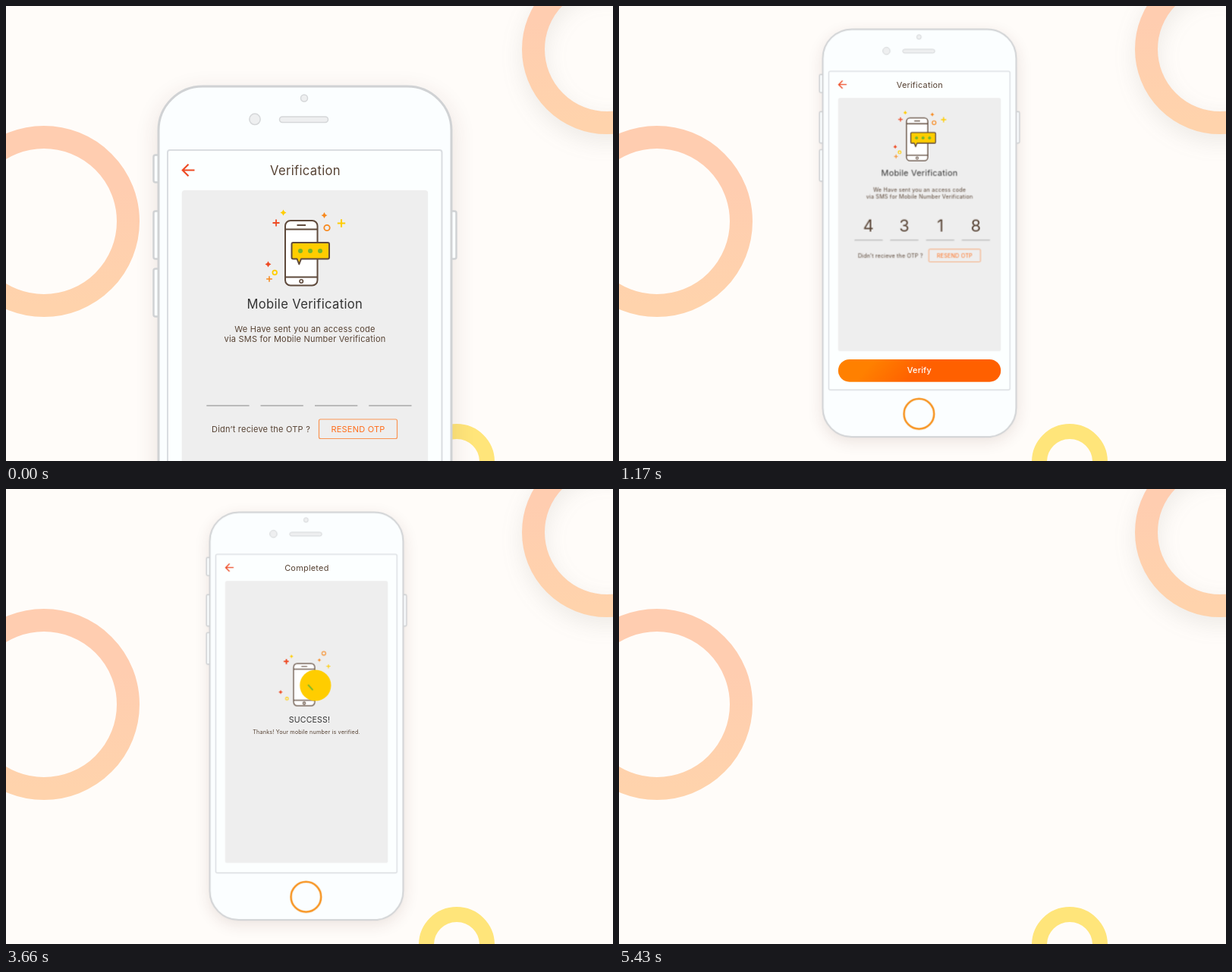
An HTML page for the animation above (5.88 s loop, 800 by 600 pixels).

```html
<!DOCTYPE html>
<html lang="en">
<head>
<meta charset="utf-8">
<title>Mobile verification</title>
<style>
html, body { margin: 0; width: 100%; height: 100%; overflow: hidden; background: #fffcf9; }
svg { display: block; width: 800px; height: 600px; }
text { font-family: Inter, "Open Sans", sans-serif; font-size: 11px; letter-spacing: .02em; text-anchor: middle; fill: #574334; }
.head { font-size: 16.6px; }
.dark { fill: #333; }
.digit { font-size: 33px; letter-spacing: 0; }
.line { fill: none; stroke: #5f4a3c; stroke-width: 2; }
.shell { fill: #fbfeff; stroke: #d0d2d4; }
.part { fill: #eeeff0; stroke: #d5d7d9; stroke-width: 1.5; }
.red { color: #ee4a23; }
.orange { color: #f7891e; }
.yellow { color: #ffcd00; }
.mark { fill: none; stroke: currentColor; stroke-width: 1.8; }

/* every animation shares one loop; smoothstep easing by default */
.a { animation: 5880ms cubic-bezier(.333, 0, .667, 1) infinite both; }
.leave { animation-name: leave; animation-timing-function: linear; }
.zoomY { animation-name: zoomY; }
.zoom { animation-name: zoom; transform-origin: 400px 59.6px; }
.panel { animation-name: panel; }
.button { animation-name: button; animation-timing-function: linear; }
.titleOut { animation-name: titleOut; }
.titleIn { animation-name: titleIn; }
.slide { animation-name: slide; }
.formOut { animation-name: formOut; animation-timing-function: linear; }
.digit { animation-name: digit; animation-delay: calc(var(--i) * 120ms); }
.iconOut { animation-name: iconOut; animation-timing-function: linear; }
.success { animation-name: success; }
.thanks { animation-name: thanks; }
.badgeY { animation-name: badgeY; }
.badgeZoom { animation-name: badgeZoom; transform-origin: 400px 444.5px; }
.phoneIn { animation-name: phoneIn; animation-timing-function: linear; }
.disc { animation-name: disc; transform-origin: 413px 446px; }
.sparks { animation-name: sparks; transform-origin: 388px 430px; }
.tick { animation-name: tick; stroke-dasharray: 1 2; }

@keyframes leave { 0%, 90.31% { opacity: 1 } 92.35%, 100% { opacity: 0 } }
@keyframes zoomY {
  0% { transform: translateY(0) }
  7%, 67.21% { transform: translateY(-59.6px) }
  73.84%, 100% { transform: translateY(0) }
}
@keyframes zoom {
  0% { transform: scale(1) }
  7%, 67.45% { transform: scale(.6605) }
  76.02%, 100% { transform: scale(1) }
}
@keyframes panel { 0%, 33.67% { height: 505.5px } 39.63%, 100% { height: 563px } }
@keyframes button {
  0%, 17% { opacity: .22 }
  19.9%, 30.1% { opacity: 1 }
  36.22%, 100% { opacity: 0 }
}
@keyframes titleOut { 0%, 37.76% { opacity: 1 } 40.4%, 100% { opacity: 0 } }
@keyframes titleIn { 0%, 39% { opacity: 0 } 41.84%, 100% { opacity: 1 } }
@keyframes slide { 0%, 39.8% { transform: translateY(0) } 47.45%, 100% { transform: translateY(125px) } }
@keyframes formOut { 0%, 39.8% { opacity: 1 } 42.18%, 100% { opacity: 0 } }
@keyframes digit { 0%, 10.88% { opacity: 0 } 12.93%, 85% { opacity: 1 } 86%, 100% { opacity: 0 } }
@keyframes iconOut { 0%, 45.92% { opacity: 1 } 48.98%, 100% { opacity: 0 } }
@keyframes success {
  0%, 46.43% { opacity: 0; transform: translateY(-16px) }
  51.02%, 100% { opacity: 1; transform: translateY(0) }
}
@keyframes thanks {
  0%, 53.57% { opacity: 0; transform: translateY(-12px) }
  59.52%, 100% { opacity: 1; transform: translateY(0) }
}
@keyframes badgeY { 0%, 67.55% { transform: translateY(-186.5px) } 76.02%, 100% { transform: translateY(0) } }
@keyframes badgeZoom { 0%, 69.98% { transform: scale(.6) } 76.02%, 100% { transform: scale(1) } }
@keyframes phoneIn { 0%, 47.45% { opacity: 0 } 49.49%, 100% { opacity: 1 } }
@keyframes disc { 0%, 51.02% { transform: scale(0) } 56.12%, 100% { transform: scale(1) } }
@keyframes sparks {
  0%, 54.08% { opacity: 0; transform: scale(.6) }
  59.86%, 100% { opacity: 1; transform: scale(1) }
}
@keyframes tick { 0%, 59.18% { stroke-dashoffset: 1.1 } 67.01%, 100% { stroke-dashoffset: 0 } }
</style>
</head>
<body>
<svg viewBox="0 0 800 600">
  <defs>
    <linearGradient id="peach" x1="0" y1="0" x2="0" y2="1">
      <stop offset=".3" stop-color="#ffcdb0"/><stop offset="1" stop-color="#ffd3ac"/>
    </linearGradient>
    <linearGradient id="fire" x1="0" y1="0" x2="1" y2=".12">
      <stop offset=".22" stop-color="#ff8000"/><stop offset=".55" stop-color="#ff6000"/>
    </linearGradient>
    <filter id="soft" x="-20%" y="-20%" width="140%" height="140%"><feGaussianBlur stdDeviation="16"/></filter>
    <path id="plus" class="mark" d="M-4.5 0H4.5M0-4.5V4.5"/>
    <path id="star" fill="currentColor" d="M0-4Q.8-.8 4 0Q.8 .8 0 4Q-.8 .8-4 0Q-.8-.8 0-4Z"/>
  </defs>

  <circle cx="50" cy="284" r="111" fill="none" stroke="url(#peach)" stroke-width="30"/>
  <circle cx="792" cy="57" r="97" fill="none" stroke="url(#peach)" stroke-width="30"
    style="filter: drop-shadow(0 10px 14px rgba(110, 110, 100, .12))"/>
  <circle cx="594" cy="601" r="40" fill="none" stroke="#ffe57a" stroke-width="20"/>

  <g class="a leave">
    <g class="a zoomY"><g class="a zoom">
      <!-- handset -->
      <rect x="200" y="114" width="388" height="814" rx="58" fill="#5a2f20" opacity=".13" filter="url(#soft)"/>
      <g class="shell" stroke-width="2.5">
        <rect x="194.5" y="196.5" width="12" height="36" rx="2.5"/>
        <rect x="194.5" y="270.5" width="12" height="63" rx="2.5"/>
        <rect x="194.5" y="346.5" width="12" height="63" rx="2.5"/>
        <rect x="581.5" y="270.5" width="12" height="63" rx="2.5"/>
      </g>
      <rect class="shell" x="201" y="106" width="386" height="814" rx="58" stroke-width="3"/>
      <g class="part">
        <circle cx="393" cy="121.5" r="4.5"/>
        <circle cx="328" cy="149.3" r="7.2"/>
        <rect x="360.5" y="146" width="64" height="7.5" rx="3.75"/>
      </g>
      <circle cx="393" cy="874" r="30" fill="none" stroke="#f7931e" stroke-width="3.8"/>
      <rect x="213" y="190" width="361.5" height="636" rx="3" fill="#fcffff" stroke="#dadde1" stroke-width="2"/>

      <!-- header -->
      <path class="mark red" style="stroke-width: 2.1" d="M248.5 216.5H233M240.5 208.7L232.7 216.5L240.5 224.3"/>
      <text class="a head titleOut" x="394.5" y="223">Verification</text>
      <text class="a head titleIn" x="394.5" y="223">Completed</text>

      <rect class="a panel" x="231.7" y="243" width="324.5" height="505.5" rx="4" fill="#eee"/>
      <g class="a button">
        <rect x="231.8" y="765" width="324.5" height="45" rx="22.5" fill="url(#fire)"/>
        <text x="393.7" y="792.5" style="font-size: 16.4px; font-weight: 500; fill: #fff">Verify</text>
      </g>

      <g class="a slide">
        <g class="a formOut">
          <text class="head dark" x="393.8" y="399">Mobile Verification</text>
          <text x="394" y="430">We Have sent you an access code</text>
          <text x="394" y="443.5">via SMS for Mobile Number Verification</text>
          <text class="a digit" style="--i: 0" x="292" y="510.5">4</text>
          <text class="a digit" style="--i: 1" x="363.7" y="510.5">3</text>
          <text class="a digit" style="--i: 2" x="435.5" y="510.5">1</text>
          <text class="a digit" style="--i: 3" x="506.2" y="510.5">8</text>
          <path d="M264.3 527h56.3M335.5 527h56.3M407 527h56.3M478.2 527h56.3" stroke="#a9a9a9" stroke-width="1.5"/>
          <text x="336" y="562">Didn’t recieve the OTP ?</text>
          <rect x="412.5" y="545" width="103" height="25.5" rx="2" fill="none" stroke="#f99555" stroke-width="1.2"/>
          <text x="464" y="562" style="fill: #ff6d1a">RESEND OTP</text>
        </g>
        <g class="a iconOut">
          <rect class="line" x="368" y="283" width="42.5" height="85.5" rx="7" style="fill: #fff"/>
          <path class="line" d="M368 294.5H410.5M368 357.5H410.5M383.5 289H395" stroke-width="1.7"/>
          <circle class="line" cx="389.2" cy="363" r="2.2" style="stroke-width: 1.6"/>
          <path class="line" style="fill: #ffcd00; stroke-linejoin: round"
            d="M378.5 312H424Q426 312 426 314V331.5Q426 333.5 424 333.5H389L386.3 340.5L383.5 333.5H378.5Q376.5 333.5 376.5 331.5V314Q376.5 312 378.5 312Z"/>
          <g fill="#74b62c">
            <circle cx="388" cy="323" r="3"/><circle cx="401" cy="323" r="3"/><circle cx="414" cy="323" r="3"/>
          </g>
          <g class="red">
            <use href="#plus" x="356" y="286"/><use href="#star" x="345.5" y="340.5"/>
          </g>
          <g class="orange">
            <use href="#star" x="419.5" y="276"/>
            <use href="#plus" transform="translate(347 360) scale(.85)"/>
            <circle class="mark" cx="423" cy="292.5" r="3.7"/>
          </g>
          <g class="yellow">
            <use href="#star" x="365.5" y="272.5"/>
            <use href="#plus" transform="translate(442 286.5) scale(1.15)"/>
            <circle class="mark" cx="354.2" cy="351.5" r="2.8"/>
          </g>
        </g>
      </g>

      <text class="a head dark success" x="400" y="526" style="font-size: 15.9px">SUCCESS!</text>
      <text class="a thanks" x="394" y="549">Thanks! Your mobile number is verified.</text>
    </g></g>

    <!-- success icon, zooming on its own -->
    <g class="a badgeY"><g class="a badgeZoom">
      <g class="a phoneIn">
        <rect class="line" x="365" y="398" width="46.5" height="93" rx="8" style="fill: #fff"/>
        <path class="line" d="M365 410.5H411.5M365 479H411.5M382 404.5H395"/>
        <circle class="line" cx="388.3" cy="485.3" r="2.6"/>
      </g>
      <g class="a sparks">
        <g class="red">
          <use href="#plus" transform="translate(349 393.7) scale(1.2)" style="stroke-width: 2.6"/>
          <path class="mark" style="stroke-width: 3" d="M343.7 393.7h10.6M349 388.4v10.6"/>
          <use href="#star" transform="translate(336.5 461) scale(1.15)"/>
        </g>
        <g class="orange">
          <use href="#star" x="421.5" y="390.5"/>
          <circle class="mark" cx="431.4" cy="375.7" r="4.1"/>
        </g>
        <g class="yellow">
          <use href="#star" x="360.4" y="382.5"/>
          <use href="#plus" x="441.5" y="404.3"/>
          <circle class="mark" cx="350.4" cy="475.3" r="3"/>
        </g>
      </g>
      <circle class="a disc" cx="413" cy="446" r="34.3" fill="#ffcd00"/>
      <path class="a tick" pathLength="1" d="M397.5 445.5L409 458L431 436" fill="none" stroke="#74b62c" stroke-width="3.2" stroke-linecap="round"/>
    </g></g>
  </g>
</svg>
</body>
</html>
```
